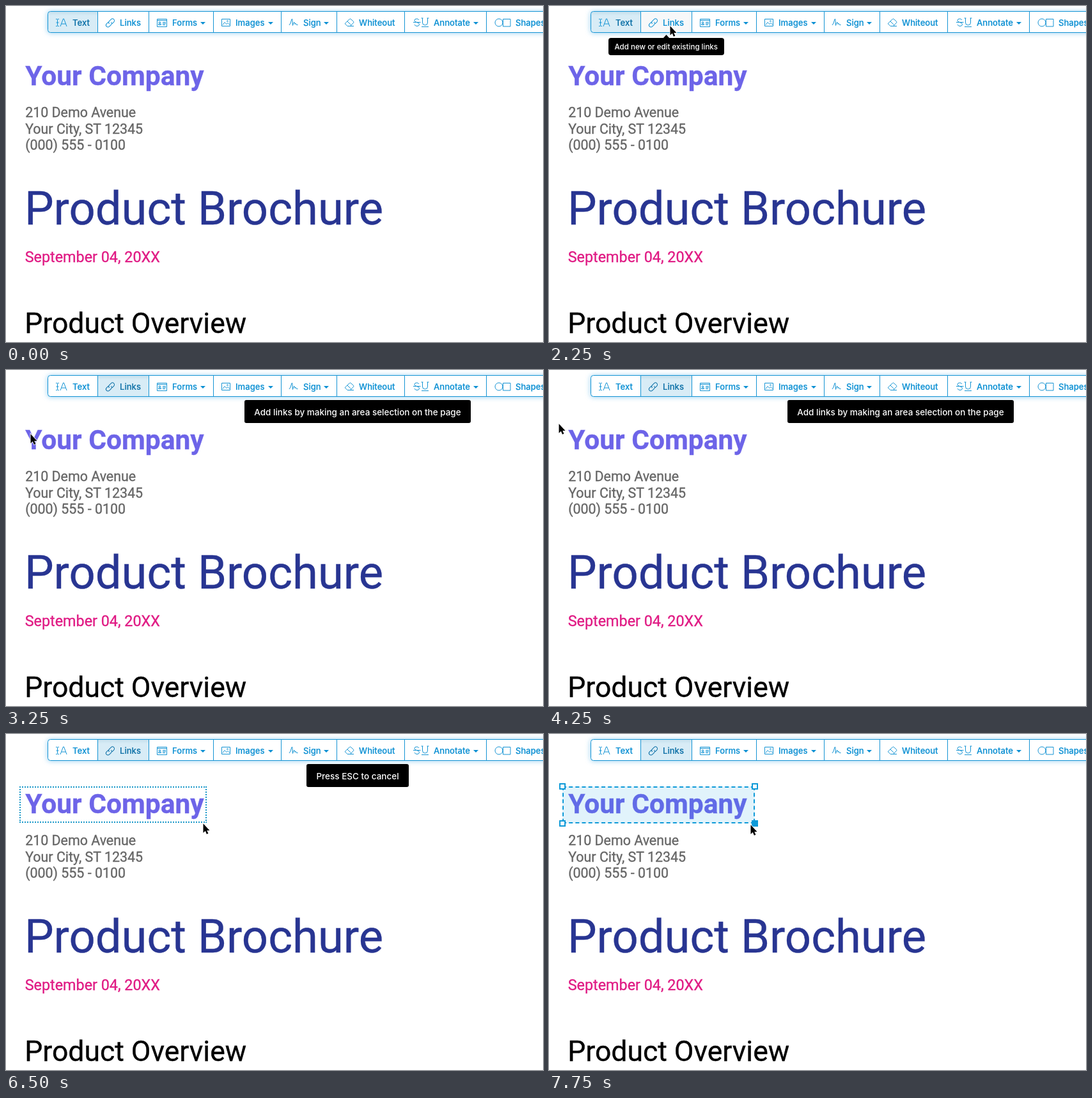
Recreate the animation shown at these times as an HTML page. Size 840x526 px, loop 8000 ms.

```html
<!DOCTYPE html>
<html lang="en">
<head>
<meta charset="utf-8">
<title>Adding a link</title>
<style>
  html, body { margin: 0; width: 100%; height: 100%; overflow: hidden; background: #fff; }
  svg { display: block; }
  .doc { font-family: Roboto, sans-serif; stroke-width: .35; }
  .ui { font-family: Inter, sans-serif; font-weight: 500; }
  .bar { font-size: 13.1px; fill: #0a8fd3; }
  .bar text { stroke: #0a8fd3; stroke-width: .15; }
  .bar .active { fill: #0b6fa6; stroke: #0b6fa6; }
  .icon { fill: none; stroke: #1594d4; stroke-width: 1; }
  .line { fill: none; stroke: #1594d4; }
  .note { font-size: 13.5px; fill: #fff; }
</style>
</head>
<body>
<svg width="840" height="526" viewBox="0 0 840 526">
  <defs>
    <filter id="glow" x="-5%" y="-80%" width="110%" height="260%"><feGaussianBlur stdDeviation="4"/></filter>
    <linearGradient id="pressed" x2="0" y2="1">
      <stop offset="0" stop-color="#c6e0ed"/>
      <stop offset=".2" stop-color="#d8ecf6"/>
      <stop offset="1" stop-color="#d8ecf6"/>
    </linearGradient>
  </defs>
  <rect width="840" height="526" fill="#fff"/>

  <g class="doc">
    <text x="30.300" y="124" font-size="42.5" font-weight="700" fill="#6d64e8" stroke="#6d64e8">Your Company</text>
    <g font-size="21.4" fill="#666" stroke="#666">
      <text x="30.200" y="174">210 Demo Avenue</text>
      <text x="30.200" y="200">Your City, ST 12345</text>
      <text x="30.200" y="225">(000) 555 - 0100</text>
    </g>
    <text x="28.900" y="342" font-size="72.4" fill="#283592" stroke="#283592">Product Brochure</text>
    <text x="29.700" y="401" font-size="23.35" fill="#e01b84" stroke="#e01b84">September 04, 20XX</text>
    <text x="29.200" y="512" font-size="44.5" stroke="#000">Product Overview</text>
  </g>

  <g class="ui bar">
    <rect x="65" y="9" width="790" height="33" rx="4" fill="#66b9e9" opacity=".7" filter="url(#glow)"/>
    <rect x="65.5" y="8.5" width="790" height="33" rx="4" fill="#fff"/>
    <path id="textFill" d="M143 9H69.500Q66 9 66 12.500V37.500Q66 41 69.500 41H143Z" fill="url(#pressed)"/>
    <rect id="linkFill" x="144" y="9" width="79" height="32"/>
    <rect class="line" x="65.5" y="8.5" width="790" height="33" rx="4"/>
    <g id="buttons"></g>
    <g class="icon">
      <path d="M78 20.500h1.500q1 0 1 1v9q0 1-1 1H78M83 20.500h-1.500q-1 0-1 1M83 31.500h-1.500q-1 0-1-1M78.500 26h4M85 32l4.500-12h1L95 32M86.700 28h6.700"/>
      <g id="chain" transform="rotate(-45 163 26.500)">
        <path d="M162 23.500h-4a3 3 0 0 0 0 6h4a3 3 0 0 0 3-3M164 29.500h4a3 3 0 0 0 0-6h-4a3 3 0 0 0-3 3"/>
      </g>
      <path d="M236.500 20.500h15v12h-15ZM236.500 22.500h15M238.500 29.500q0-2 2-2t2 2ZM245 25.500h5M245 27.500h5M245 29.500h4"/>
      <circle cx="240.500" cy="26" r="1.300"/>
      <path d="M337.500 20.500h13v11h-13ZM339 29.500l3-4 3 3 2-2 3 3"/>
      <circle cx="346.500" cy="23.500" r="1"/>
      <path d="M443 30l2-3 2-6.500q1-1 1 2l.5 8q1-4 2-5t1.500 3q1-2 1.500-1t1 2h2"/>
      <path d="M530.500 27l7-6.500q1-.8 2 0l4 3.800q.8 1 0 1.800l-5 5.400h-4.500l-3.500-3.500ZM534 24l5.500 5.500M538 31.500h6"/>
      <path d="M646 22q-1-2-3.500-2-3.500 0-3.500 2.700 0 2.300 4 3 3.500.8 3.500 3 0 2.800-3.500 2.800-3 0-4-2.500M637 25.500h11.500M651.500 19v7q0 4 4 4t4-4v-7M649.500 19h3M658.500 19h3M650 32.500h11"/>
      <circle cx="771" cy="26" r="6"/>
      <path d="M777.500 20.500h11.500v11.500h-11.500Z"/>
    </g>
  </g>

  <g id="tooltip" class="ui">
    <path d="M178 51l5.500-6 5.500 6Z"/>
    <rect x="93" y="50" width="181" height="27" rx="4"/>
    <text x="102.500" y="67.700" font-size="11.55" fill="#fff">Add new or edit existing links</text>
  </g>
  <g id="banner" class="ui note">
    <rect id="bannerBox" y="47" height="36" rx="3" fill="#000"/>
    <text id="bannerText" x="550" y="71" text-anchor="middle"></text>
  </g>

  <path id="drag" fill="none" stroke="#1596c8" stroke-width="2" stroke-dasharray="2 2"/>
  <g id="link" stroke="#0e9ad8" stroke-width="2">
    <rect x="21" y="82" width="301" height="58" fill="#0e9ad8" fill-opacity=".12" stroke="none"/>
    <path id="linkEdge" fill="none" stroke-dasharray="6 4.17"/>
    <g id="handles"></g>
  </g>

  <path id="cursor" d="M.5 .3V14.800L3.800 11.800 5.900 16.800 8.400 15.700 6.300 10.900H10.500Z" stroke="#fff" stroke-width="1.6" paint-order="stroke"/>
</svg>

<script>
const LOOP = 8000;
const $ = id => document.getElementById(id);

// label, text x, caret centre, right edge
const buttons = [
  ["Text", 104, 0, 143.5], ["Links", 178, 0, 223.5], ["Forms", 260, 308, 324.5],
  ["Images", 359, 414, 430.5], ["Sign", 465, 501, 517.5], ["Whiteout", 552, 0, 623.5],
  ["Annotate", 669, 735, 751.5], ["Shapes", 797, 0, 860]
];
$("buttons").innerHTML = buttons.map(([label, x, caret, edge]) =>
  `<text id="label${label}" x="${x}" y="31">${label}</text>` +
  (caret ? `<path d="M${caret - 4} 25h8l-4 4Z"/>` : "") +
  `<path class="line" d="M${edge} 9V41"/>`).join("");

$("handles").innerHTML = [[21, 82], [322, 82], [21, 140], [322, 140]].map(([x, y], i) =>
  `<rect x="${x - 4}" y="${y - 4}" width="8" height="8" fill="${i === 3 ? "#0e9ad8" : "#fff"}"/>`).join("");

// The pointer jumps from place to place: time, x, y
const pointerStops = [
  [500, 325, 44], [750, 298, 44], [1250, 201, 37], [1500, 193, 33], [1750, 189, 31],
  [3000, 58, 104], [3250, 38, 100], [3500, 20, 97], [3750, 17, 90], [4000, 16, 86], [4250, 15, 84],
  [5000, 58, 108], [5250, 133, 132], [5500, 220, 141], [5750, 288, 145],
  [6000, 314, 147], [6250, 319, 144], [6500, 308, 140], [6750, 315, 142]
];

const show = (id, on) => $(id).setAttribute("visibility", on ? "visible" : "hidden");
const set = (id, attrs) => {
  for (const name in attrs) $(id).setAttribute(name, attrs[name]);
};

// Four separate sides, so that the dashes restart at each corner
const sides = (left, top, right, bottom) =>
  `M${left} ${top + 1}H${right}M${left} ${bottom - 1}H${right}` +
  `M${left + 1} ${top}V${bottom}M${right - 1} ${top}V${bottom}`;

set("linkEdge", { d: sides(21, 82, 322, 140) });

function setBanner(message, width) {
  set("bannerBox", { x: 550 - width / 2, width });
  $("bannerText").textContent = message;
}

function render(t) {
  const within = (from, to) => t >= from && t < to;
  const linksActive = t >= 2500;

  show("textFill", !linksActive);
  set("labelText", { class: linksActive ? "" : "active" });
  set("labelLinks", { class: linksActive ? "active" : "" });
  set("chain", { stroke: linksActive ? "#0b6fa6" : "#1594d4" });
  show("linkFill", t >= 1250);
  set("linkFill", { fill: linksActive ? "url(#pressed)" : "#f7f8f9" });

  show("tooltip", within(2000, 3000));
  show("banner", within(3000, 7250));
  if (t < 4750) setBanner("Add links by making an area selection on the page", 354);
  else setBanner("Press ESC to cancel", 160);

  const stop = pointerStops.filter(([time]) => time <= t).pop();
  show("cursor", stop);
  if (stop) {
    const [, x, y] = stop;
    set("cursor", { transform: `translate(${x} ${y})` });
    set("drag", { d: sides(21, 82, x + 6, y - 1) });
  }
  show("drag", within(5000, 7250));
  show("link", t >= 7250);
}

const start = performance.now();
function tick() {
  render((performance.now() - start) % LOOP);
  requestAnimationFrame(tick);
}
tick();
</script>
</body>
</html>
```
